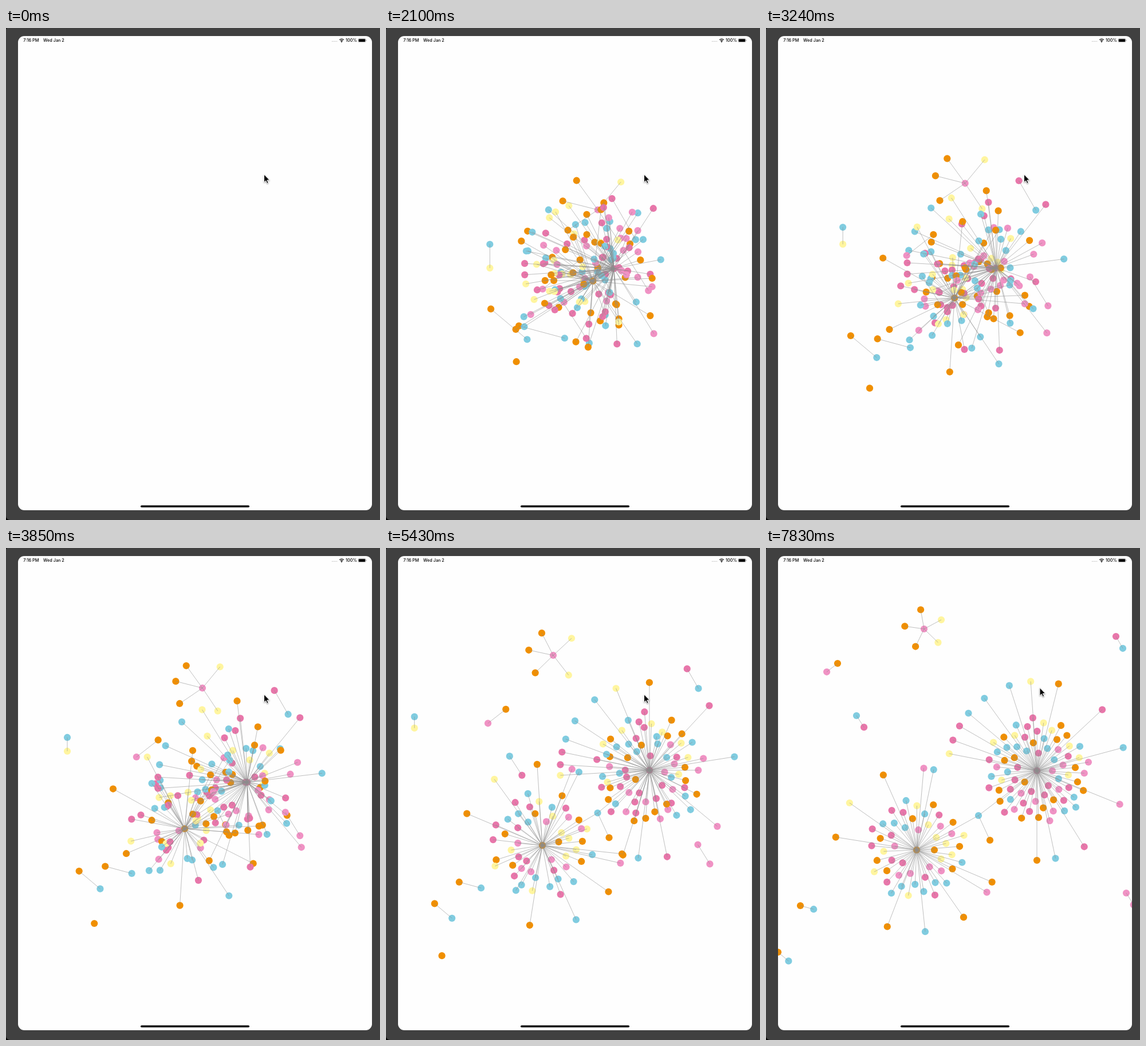
Recreate the animation shown at these times as an HTML page with a canvas. Size 653 px wide and 857 px high, loop 8000 ms.

```html
<!DOCTYPE html>
<html lang="en">
<head>
<meta charset="utf-8">
<title>Force-directed graph</title>
<style>
  html, body { margin: 0; width: 100%; height: 100%; overflow: hidden; background: #000; }
  #frame { position: absolute; inset: 0; background: #404040; border-radius: 3px 0 0 7px; }
  canvas { position: absolute; left: 21px; top: 14px; background: #fefefe; border-radius: 11px; }
  svg { position: absolute; left: 0; top: 0; }
  text { font: 500 7.3px Inter, sans-serif; }
</style>
</head>
<body>
<div id="frame"></div>
<canvas width="618" height="826"></canvas>
<svg width="653" height="857">
  <text x="30.3" y="24.3">7:16 PM</text>
  <text x="65" y="24.3">Wed Jan 2</text>
  <text x="593" y="24.3">100%</text>
  <path d="M569 23.3h10" stroke="#aaa" stroke-dasharray="1.2 1.2"/>
  <g fill="none" stroke="#000" stroke-width="1.3">
    <path d="M582.2 20.6q3.8-3 7.6 0M583.8 22.4q2.2-1.7 4.4 0"/>
    <circle cx="586" cy="24" r=".4"/>
  </g>
  <rect x="614.9" y="18.4" width="13.2" height="6.4" rx="1.8" fill="none" stroke="#999" stroke-width=".6"/>
  <rect x="615.7" y="19.2" width="11.6" height="4.8" rx="1.1"/>
  <path d="M629.3 20.7v1.8" stroke="#999" stroke-width=".8"/>
  <rect x="235" y="831.5" width="190" height="3.6" rx="1.8"/>
  <path id="cursor" d="M0 0V13.8L3.2 10.9L5.4 15.7L7.6 14.7L5.4 10H9.8Z" stroke="#fff"
    style="filter: drop-shadow(0 1px 1px #0006)"/>
</svg>
<script>
const LOOP = 8000, APPEAR = 840, RADIUS = 6.1, GOLDEN = 137.508;
const CENTER = [340, 430], BOX = { x: 346, y: 422, w: 122, h: 112 };
const COLORS = { o: '#f08f00', b: '#80cce0', y: '#fff59f', p: '#e876aa', k: '#f092c4' };
const MIX = 'oooobbbyyypppkkk';

// Each curve holds its values at these times
const TIMES = [1510, 2680, 3850, 5430, 6740, 7830];
const DRIFT = [0, .187, .404, .643, .834, 1];     // way travelled by the small groups
const STRETCH = [4, 2.9, 2, 1.65, 1.17, 1];       // length of their links
const ORDER = [0, .75, .95, 1.04, 1, 1];          // share of the settled offset
const CHAOS = [1, .5, .25, .06, 0, 0];            // share of the random start
const SPLAY = [30, 30, 30, 20, 10, 0];            // degrees that spokes bend together

function at(keys, values, x) {
  let i = 1;
  while (i < keys.length - 1 && x > keys[i]) i++;
  const f = Math.min(1, Math.max(0, (x - keys[i - 1]) / (keys[i] - keys[i - 1])));
  return values[i - 1] + (values[i] - values[i - 1]) * f;
}
const curve = (values, t) => at(TIMES, values, t);

const rad = deg => deg * Math.PI / 180;
const polar = (r, deg) => [r * Math.cos(rad(deg)), r * Math.sin(rad(deg))];
const plus = (a, b, k = 1) => [a[0] + b[0] * k, a[1] + b[1] * k];
const bend = (deg, toward, t) => deg - curve(SPLAY, t) * Math.sin(rad(deg - toward));

let seed = 4711;
const random = () => (seed = seed * 16807 % 2147483647) / 2147483647;
const randomStart = () =>
  [BOX.x + (random() * 2 - 1) * BOX.w, BOX.y + (random() * 2 - 1) * BOX.h];
const clampToBox = ([x, y]) => [
  Math.max(BOX.x - BOX.w, Math.min(BOX.x + BOX.w, x)),
  Math.max(BOX.y - BOX.h, Math.min(BOX.y + BOX.h, y))];

const nodes = [], links = [];
function add(color, place, ...parents) {
  const node = { color, place, order: random() };
  nodes.push(node);
  for (const parent of parents) links.push([node, parent]);
  return node;
}
const addPath = (color, xs, ys) => add(color, t => [curve(xs, t), curve(ys, t)]);

// Satellites settle into an even disc around the hub
function addSatellites(hub, count, inner, outer) {
  const origin = hub.place(0);
  for (let i = 0; i < count; i++) {
    const r = Math.sqrt(inner ** 2 + (outer ** 2 - inner ** 2) * i / (count - 1));
    const settled = polar(r, i * GOLDEN);
    const start = plus(randomStart(), origin, -1);
    add(MIX[Math.floor(random() * MIX.length)], t => plus(
      plus(hub.place(t), settled, curve(ORDER, t)), start, curve(CHAOS, t)), hub);
  }
}

// Long spokes share one length and open away from the other hub
function addSpokes(hub, toward, length, colors, angles) {
  const origin = hub.place(0);
  angles.forEach((angle, i) => {
    const offset = t => polar(length, bend(angle, toward, t));
    const start = plus(clampToBox(plus(origin, offset(0))), origin, -1);
    add(colors[i], t => {
      const w = curve(CHAOS, t);
      return plus(plus(hub.place(t), offset(t), 1 - w), start, w);
    }, hub);
  });
}

// A pair drifts straight outward while its link shortens
function addPair(colors, x0, y0, x1, y1, angle, length = 24) {
  const root = add(colors[0], t => {
    const d = curve(DRIFT, t);
    return [x0 + (x1 - x0) * d, y0 + (y1 - y0) * d];
  });
  if (colors[1])
    add(colors[1], t => plus(root.place(t), polar(length, angle), curve(STRETCH, t)), root);
}

const right = addPath('p', [411, 385, 421, 460, 471, 473], [411, 427, 408, 387, 387, 388]);
const left = addPath('o', [378, 345, 312, 273, 265, 263], [428, 453, 489, 518, 522, 526]);
addSatellites(right, 72, 27, 93);
addSatellites(left, 50, 31, 88);
addSpokes(right, 147, 156, 'yppbbbyopbkpbo',
  [191, 200, 210, 220, 234, 252, 266, 284, 317, 345, 22, 58, 78, 90]);
addSpokes(left, -33, 143, 'oyokbokobo', [189, 215, 246, 275, 282, 23, 31, 55, 84, 111]);

const bridge = add('b', t => {
  const [x, y] = plus(left.place(t), right.place(t));
  return [x / 2 + 3, y / 2 + 9];
}, left, right);
add('o', t => plus(bridge.place(t), [20, 43]), bridge);

const star = addPath('k', [388, 352, 343, 292, 278, 276], [339, 295, 244, 187, 150, 141]);
[...'yyooo'].forEach((color, i) => add(color, t => plus(star.place(t),
  polar(34 * Math.sqrt(curve(STRETCH, t)), bend(i * 72 - 28, 200, t))), star));

addPair('by', 204, 391, -36, 240, 90, 12);
addPair('ok', 361, 425, 125, 201, 142);
addPair('bp', 320, 490, 158, 292, 57);
addPair('ob', 200, 467, 21, 704, 40);
addPair('ob', 250, 508, 60, 623, 15);
addPair('pb', 372, 312, 611, 154, 60);
addPair('kk', 392, 365, 629, 601, 58);
addPair('o', 250, 559, 13, 794);
nodes.sort((a, b) => a.order - b.order);

const ctx = document.querySelector('canvas').getContext('2d');
const cursor = document.getElementById('cursor');
ctx.translate(-21, -14);
ctx.strokeStyle = '#8c8c8c';
ctx.lineWidth = .55;

function draw(now) {
  const t = now % LOOP;
  ctx.clearRect(0, 0, 653, 857);
  if (t >= APPEAR) {
    const spread = at([1020, 1510], [.9, 1], t);
    for (const n of nodes) {
      [n.x, n.y] = plus(CENTER, plus(n.place(t), CENTER, -1), spread);
      ctx.fillStyle = COLORS[n.color];
      ctx.beginPath();
      ctx.arc(n.x, n.y, RADIUS, 0, 7);
      ctx.fill();
    }
    for (const [a, b] of links) {
      ctx.beginPath();
      ctx.moveTo(a.x, a.y);
      ctx.lineTo(b.x, b.y);
      ctx.stroke();
    }
  }
  const move = at([7400, 7830], [0, 1], t);
  cursor.setAttribute('transform', `translate(${450.5 + 27.5 * move} ${255 - 11.5 * move})`);
  requestAnimationFrame(draw);
}
requestAnimationFrame(draw);
</script>
</body>
</html>
```
